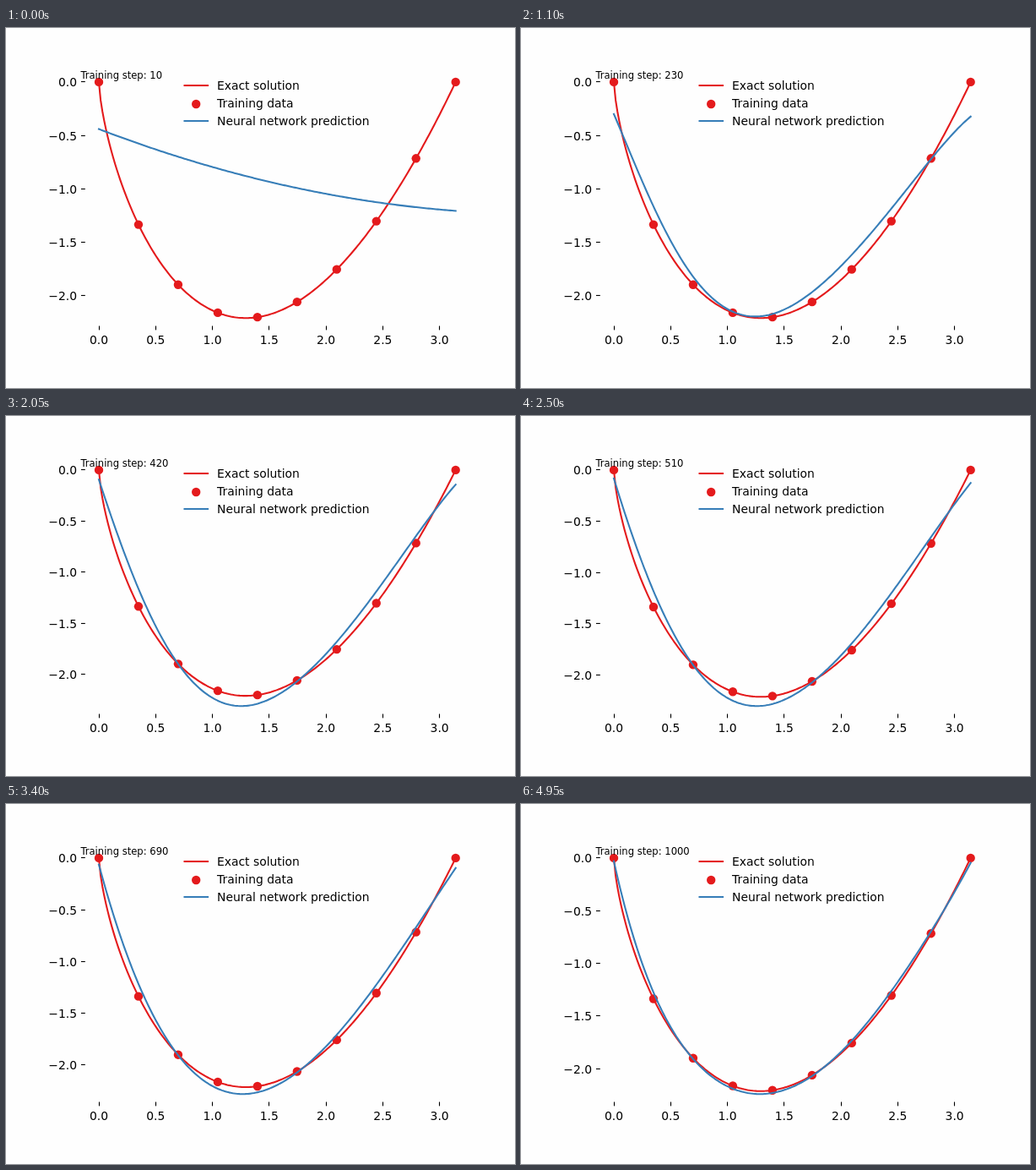
Write an HTML page with a canvas that moves like this. It is 603x426 px and loops after 5 s.

```html
<!DOCTYPE html>
<html lang="en">
<head>
<meta charset="utf-8">
<title>Neural network training</title>
<style>
html, body { margin: 0; height: 100%; overflow: hidden; background: #fefefe; }
canvas { display: block; }
</style>
</head>
<body>
<canvas id="plot" width="603" height="426"></canvas>
<script>
const ctx = document.getElementById('plot').getContext('2d');
const RED = '#e41a1c', BLUE = '#377eb8';
const LEFT = 110, X_UNIT = 134.55, TOP = 63.9, HEIGHT = 279.3;
const POINTS = 10, MODES = 7, SAMPLES = 200;

const exact = x => x ** 0.7 * (x - Math.PI);
const px = x => LEFT + X_UNIT * x;
const sum = values => values.reduce((a, b) => a + b, 0);
const range = (count, f) => Array.from({ length: count }, (_, i) => f(i));
const trainX = range(POINTS, i => i * Math.PI / (POINTS - 1));

// Polynomials that are orthogonal over the training points.
function basis(x) {
  const u = (x / Math.PI - 0.5) * (POINTS - 1);
  const p = [1, u];
  for (let m = 1; m < MODES - 1; m++) {
    p.push(u * p[m] - m * m * (POINTS ** 2 - m * m) / (4 * (4 * m * m - 1)) * p[m - 1]);
  }
  return p;
}

// How much of the exact solution lies in each mode.
const trainBasis = trainX.map(basis);
const coefficients = range(MODES, m =>
  sum(trainX.map((x, i) => exact(x) * trainBasis[i][m])) / sum(trainBasis.map(p => p[m] ** 2)));

// Learned share of each mode: its start, and its lasting bias that slowly fades.
const START = [0.67, -1.62, 0.06, 0, 0, 0, 0];
const BIAS = [0, 0, -0.02, 0.25, -1.2, -1.3, -1.4];

function learned(m, step) {
  const goal = 1 + BIAS[m] * (1 - (step - 420) / 860);
  const settle = Math.min(160, 60 + 60 * m);
  return goal + (START[m] - goal) * Math.exp(-(((step - 10) / settle) ** 2));
}

function predictor(step) {
  const weights = coefficients.map((c, m) => c * learned(m, step));
  return x => sum(basis(x).map((p, m) => p * weights[m]));
}

const sample = f => range(SAMPLES + 1, i => {
  const x = Math.PI * i / SAMPLES;
  return [x, f(x)];
});
const exactCurve = sample(exact);

function line(points, color, width = 2.08) {
  ctx.beginPath();
  for (const [x, y] of points) ctx.lineTo(x, y);
  ctx.strokeStyle = color;
  ctx.lineWidth = width;
  ctx.stroke();
}

function dot(x, y) {
  ctx.beginPath();
  ctx.arc(x, y, 5.2, 0, 2 * Math.PI);
  ctx.fillStyle = RED;
  ctx.fill();
}

function text(str, x, y, align = 'left', size = 13.89) {
  ctx.font = `${size}px "DejaVu Sans", sans-serif`;
  ctx.textAlign = align;
  ctx.fillStyle = '#000';
  ctx.fillText(str, x, y);
}

function draw(step) {
  const curve = sample(predictor(step));
  const depth = -Math.min(...[...exactCurve, ...curve].map(p => p[1]));
  const py = y => TOP - y * HEIGHT / depth;
  const toPixels = points => points.map(([x, y]) => [px(x), py(y)]);

  ctx.fillStyle = '#fefefe';
  ctx.fillRect(0, 0, 603, 426);
  ctx.lineJoin = 'round';

  for (const x of trainX) dot(px(x), py(exact(x)));
  ctx.lineCap = 'square';
  line(toPixels(exactCurve), RED);
  line(toPixels(curve), BLUE);

  ctx.lineCap = 'butt';
  for (let v = 0; v <= 3; v += 0.5) {
    const x = Math.floor(px(v)) + 0.5;
    line([[x, 352.5], [x, 357.4]], '#000', 1.11);
    text(v.toFixed(1), px(v), 374, 'center');
  }
  for (let v = 0; v <= 2; v += 0.5) {
    const y = Math.floor(py(-v)) + 0.5;
    line([[89, y], [93.8, y]], '#000', 1.11);
    text((v ? '\u2212' : '') + v.toFixed(1), 84, Math.round(py(-v) + 5.5), 'right');
  }

  ctx.lineCap = 'square';
  line([[211.5, 68], [239, 68]], RED);
  dot(225.2, 90);
  line([[211.5, 110], [239, 110]], BLUE);
  text('Exact solution', 250, 73);
  text('Training data', 250, 94);
  text('Neural network prediction', 250, 115);
  text(`Training step: ${step}`, 88.4, 60, 'left', 11.57);
}

function tick() {
  draw(10 * (1 + Math.floor(performance.now() % 5000 / 50)));
  requestAnimationFrame(tick);
}
tick();
</script>
</body>
</html>
```
